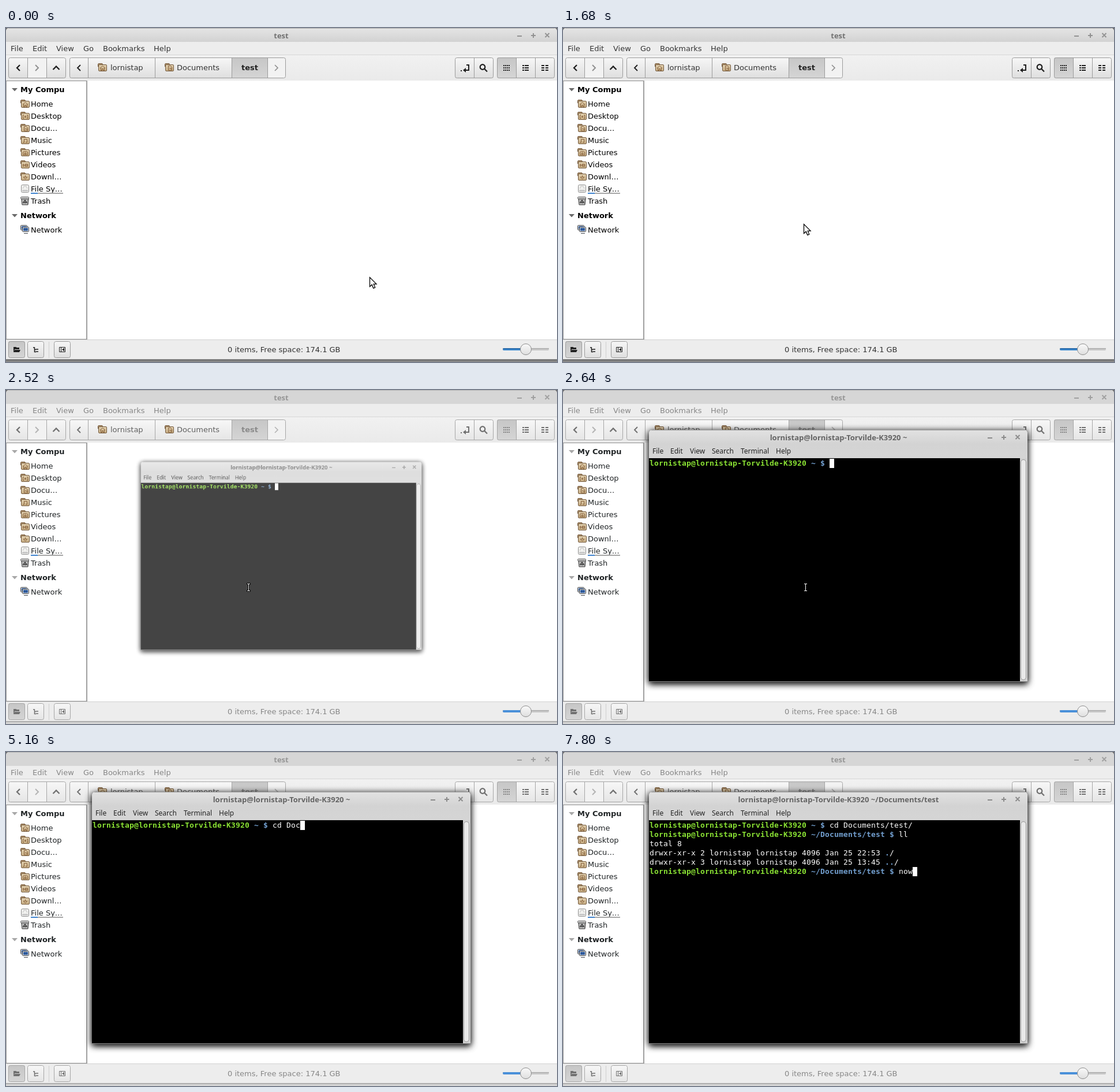
An HTML page with a canvas that plays this animation: 955 px wide and 578 px high, repeating every 8000 ms.

```html
<!DOCTYPE html>
<html lang="en">
<head>
<meta charset="utf-8">
<title>Terminal demo</title>
<style>
html, body { margin: 0; width: 100%; height: 100%; overflow: hidden; background: #777; }
canvas { display: block; }
</style>
</head>
<body>
<canvas id="stage" width="955" height="578"></canvas>
<script>
const W = 955, H = 578, LOOP = 8000, STEP = 120;
const UI = '13px "DejaVu Sans", sans-serif', UIB = 'bold ' + UI;
const TITLE = 'bold 13px "Noto Sans", sans-serif', SMALL = '12px "Noto Sans", sans-serif';
const MONO = '13px "DejaVu Sans Mono", monospace';
const USER = 'lornistap', HOST = USER + '@' + USER + '-Torvilde-K3920';

function layer(paint) {
  const c = document.createElement('canvas');
  c.width = W; c.height = H;
  const g = c.getContext('2d');
  if (paint) paint(g);
  return c;
}
function text(g, s, x, y, font, color, align = 'left') {
  g.font = font; g.fillStyle = color; g.textAlign = align;
  g.fillText(s, x, y);
}
function rect(g, x, y, w, h, color) { g.fillStyle = color; g.fillRect(x, y, w, h); }
function path(g, x, y, d, stroke, width = 2, fill) {
  const p = new Path2D(d);
  g.save();
  g.translate(x, y);
  if (fill) { g.fillStyle = fill; g.fill(p); }
  if (stroke) { g.strokeStyle = stroke; g.lineWidth = width; g.stroke(p); }
  g.restore();
}
function stops(d, colors) {
  colors.forEach((c, i) => d.addColorStop(i / (colors.length - 1), c));
  return d;
}
const down = (g, y0, y1, ...colors) => stops(g.createLinearGradient(0, y0, 0, y1), colors);
const across = (g, x0, x1, ...colors) => stops(g.createLinearGradient(x0, 0, x1, 0), colors);
function round(g, x, y, w, h, r, fill, stroke) {
  g.beginPath();
  g.roundRect(x, y, w, h, r);
  if (fill) { g.fillStyle = fill; g.fill(); }
  if (stroke) { g.strokeStyle = stroke; g.lineWidth = 1; g.stroke(); }
}
function menu(g, words, x, y, gap, font, color) {
  for (const word of words.split(' ')) {
    text(g, word, Math.round(x), y, font, color);
    x += g.measureText(word).width + gap;
  }
}
function controls(g, x, y, color) {
  path(g, x, y, 'M-4 1h8M20 0h8M24-4v8M44.5-4l7 7m0-7l-7 7', color);
}

// --- wallpaper: soft gradients in the tones of a night sky ---
function sky(g) {
  const LEAN = .18;
  let seed = 19;
  const rnd = () => (seed = seed * 16807 % 2147483647) / 2147483647;
  const blob = (x, y, rx, ry, color, alpha = .8, lean = 0) => {
    g.save();
    g.globalAlpha = alpha;
    g.transform(1, 0, -lean, 1, 0, 0);
    g.translate(x, y); g.scale(rx, ry);
    g.fillStyle = stops(g.createRadialGradient(0, 0, 0, 0, 0, 1), [color, color + 'd0', color + '80', color + '30', color + '00']);
    g.fillRect(-1, -1, 2, 2);
    g.restore();
  };
  // x is where the leaning ray would meet the top edge
  const ray = (x, y, rx, ry, color, alpha) => blob(x, y, rx, ry, color, alpha, LEAN);
  const veil = (fill, mask, lean = 0) => g.drawImage(layer(v => {
    v.transform(1, 0, -lean, 1, 0, 0);
    rect(v, 0, 0, W * 2, H, fill);
    v.globalCompositeOperation = 'destination-in';
    rect(v, 0, 0, W * 2, H, mask);
  }), 0, 0);

  rect(g, 0, 0, W, H, down(g, 0, H, '#3f8277', '#4a9d7a', '#459470', '#46956e', '#7ccc8a', '#62a680', '#48625f', '#35505a', '#132d4a'));
  blob(270, 90, 190, 160, '#74c898');
  blob(510, 80, 160, 280, '#82969a');
  blob(470, 215, 170, 140, '#a5b49f');
  blob(40, 300, 190, 60, '#94ea88', .6);
  blob(300, 380, 200, 70, '#64896e');
  blob(330, 285, 180, 75, '#aee596');
  blob(405, 310, 120, 75, '#f2f0b4', .9);
  blob(560, 380, 140, 110, '#8f9580');
  blob(310, 450, 210, 90, '#7f865f', .7);
  blob(550, 460, 190, 90, '#9c8f62', .8);

  veil(down(g, 0, H, '#336458', '#2f6059', '#2c5a5b', '#223f55', '#13294a', '#0f2246'), across(g, 690, W, '#0000', '#000b', '#000'));
  blob(955, 70, 80, 130, '#43906f', .6);
  blob(800, 340, 110, 200, '#4b5d6c', .7);
  blob(610, 330, 90, 110, '#a8949d', .7);

  veil(across(g, 570, 850, '#75478b00', '#75478b', '#643b82', '#6c4088', '#87509a', '#7c4489', '#71497f80', '#71497f00'),
    down(g, 0, 480, '#000', '#000', '#000c', '#0006', '#0000'), LEAN);
  for (let i = 0; i < 16; i++) ray(610 + rnd() * 200, 60 + rnd() * 240, 5 + rnd() * 10, 180, i % 2 ? '#b078b0' : '#583480', .2);
  ray(597, 205, 24, 125, '#d2c8be', .8);
  ray(840, 150, 35, 140, '#6a8090', .5);
  ray(744, 200, 32, 240, '#c283b0', .75);
  ray(778, 310, 24, 170, '#7e3f80', .8);
  ray(734, 340, 38, 130, '#f0cdb0', .85);
  ray(813, 330, 14, 190, '#b591a5', .6);
  ray(612, 450, 36, 85, '#c2a66c', .8);
  blob(710, 470, 60, 30, '#829838');
  blob(645, 438, 52, 52, '#ffe18d', 1);
  ray(821, 470, 8, 45, '#c4bd78', .8);

  rect(g, 0, 0, W, H, down(g, 495, 545, '#16334d00', '#16334d', '#15314d'));
  blob(970, 500, 200, 160, '#0f2146', .9);
  for (let i = 0; i < 85; i++) {
    g.beginPath();
    g.arc(rnd() * W, rnd() * 490, .4 + rnd() * .8, 0, 7);
    g.fillStyle = '#dff4f5b0';
    g.fill();
  }
}

// --- file manager ---
const EMBLEMS = {
  home: 'M4 9.5l4.5-4 4.5 4M5.5 9v4.5h2v-3h2v3h2V9',
  desk: 'M6 6.5H4.5v6H6M11 6.5h1.5v6H11M7.5 8.5h2v2h-2z',
  doc: 'M6.5 5.5h4l2 2.5v5h-6zM8 9.5h3v2',
  music: 'M6.5 12V6.5h5V12M4 12h3M9 12h3',
  pic: 'M4.5 7.5l2-1h4l2 1v5h-8zM7 9h3v2H7z',
  video: 'M4.5 7.5l3 2-3 2zM8.5 7.5h4v4h-4zM8 9.5h5',
  down: 'M8.5 6v3H5l3.5 3.5L12 9H8.5'
};
function folder(g, x, y, kind) {
  round(g, x + .5, y + 1.5, 8, 6, 1.5, '#b5976f', '#745a3e');
  round(g, x + 1.5, y + 3.5, 14, 11, 1.5, down(g, y + 3, y + 15, '#e3d2b2', '#c4aa80'), '#745a3e');
  path(g, x, y, EMBLEMS[kind], '#86603b', 1);
}
function device(g, x, y, kind) {
  if (kind === 'disk') {
    round(g, x + 1.5, y + 1.5, 13, 13, 2, '#f1f1ef', '#8e8e8e');
    path(g, x, y, 'M4 8l2-4h4l2 4', '#c2c2c2', 1);
    rect(g, x + 3, y + 10, 10, 3, '#c9c9c9');
  } else if (kind === 'bin') {
    path(g, x, y, 'M1.5 3h13l-1.5 12H3z', '#444', 1, '#a0a0a0');
    round(g, x + .5, y + 1.5, 14, 3, 1, '#e0e0e0', '#444');
    path(g, x, y, 'M4.5 6v8M7.5 6v8M10.5 6v8', '#ddd', 1);
    path(g, x, y, 'M5 11l3-4 3 4z', '#333', 1.3);
  } else {
    for (const d of [0, 3]) {
      round(g, x + d + .5, y + d + .5, 11, 8, 1, '#e8e8e8', '#353a40');
      rect(g, x + d + 2, y + d + 2, 8, 5, '#2f5b9c');
    }
    rect(g, x + 6, y + 14, 7, 1, '#454a50');
  }
}
function files(g, focus) {
  const ink = focus ? '#1f1f1f' : '#707070', soft = focus ? '#333' : '#878787';
  const body = focus ? '#000' : '#202426', edge = focus ? '#9b9b9b' : '#a6a6a6';
  const off = focus ? '#909090' : '#b4b4b4', label = focus ? '#333' : '#606060';

  rect(g, 0, 0, W, H, '#666');
  round(g, 0, 0, W, 60, [5, 5, 0, 0], focus ? down(g, 0, 24, '#e5e5e5', '#d2d2d2') : '#d6d6d6');
  rect(g, 4, 0, W - 8, 1, focus ? '#aaa' : '#b5b5b5');
  text(g, 'test', 477, 18, TITLE, focus ? '#727272' : '#969696', 'center');
  controls(g, 890, 13, focus ? '#929292' : '#a0a0a0');
  rect(g, 0, 24, W, 550, '#ededed');
  rect(g, 0, 46, W, 1, '#d6d6d6');
  rect(g, 0, 47, W, 44, down(g, 47, 91, '#f1f1f1', '#eaeaea'));
  menu(g, 'File Edit View Go Bookmarks Help', 8, 40, 16, UI, soft);

  const group = (xs, y, h, pressed, disabled) => {
    const x = xs[0], w = xs[xs.length - 1] - x;
    g.save();
    round(g, x, y, w, h, 3);
    g.clip();
    xs.slice(0, -1).forEach((left, i) => {
      rect(g, left, y, xs[i + 1] - left, h, i === pressed ? down(g, y, y + h, '#c6c6c6', '#d5d5d5')
        : i === disabled ? '#f2f2f2' : down(g, y, y + h, '#f7f7f7', focus ? '#dedede' : '#e5e5e5'));
      if (i) rect(g, left, y, 1, h, edge);
    });
    g.restore();
    round(g, x + .5, y + .5, w - 1, h - 1, 3, null, edge);
  };
  group([4, 37, 70, 104], 51, 36, -1, 1);
  group([110, 142, 258, 391, 453, 485], 51, 36, 3, 4);
  group([778, 811, 845], 51, 36);
  group([851, 884, 917, 951], 51, 36, 0);

  const LEFT = 'M2.5-5l-5 5 5 5', RIGHT = 'M-2.5-5l5 5-5 5';
  path(g, 21.5, 69, LEFT, ink, 2.3);
  path(g, 53.5, 69, RIGHT, off);
  path(g, 87, 69, 'M-5.5 3L0-2.5 5.5 3', ink, 2.3);
  path(g, 126.5, 69, LEFT, ink, 1.9);
  path(g, 468.5, 69, RIGHT, off, 1.7);
  folder(g, 159, 60, 'home');
  folder(g, 275, 60, 'doc');
  text(g, USER, 181, 73, UI, label);
  text(g, 'Documents', 296, 73, UI, label);
  text(g, 'test', 408, 73, UIB, focus ? '#222' : '#8a8a8a');

  path(g, 788, 64, 'M0 10h2M10 0h4v9H9', ink);
  path(g, 788, 64, 'M4 9l5-4v8z', null, 0, ink);
  path(g, 826, 67.5, 'M4.3 0a4.3 4.3 0 1 1-8.6 0a4.3 4.3 0 1 1 8.6 0M3 3l5 5', ink, 2.2);
  for (let y = 64; y < 76; y += 4) {
    for (let c = 0; c < 4; c++) rect(g, 862 + c * 3, y, 2, 2, focus ? ink : '#858585');
    path(g, 895, y + 1, 'M0 0h3m1 0h7M33 0h5m2 0h5', ink);
  }

  rect(g, 0, 91, W, 449, '#fff');
  rect(g, 0, 91, 141, 1, '#8f8f8f');
  rect(g, 0, 91, 1, 448, '#9b9b9b');
  rect(g, 139, 91, 2, 448, '#a0a0a0');
  rect(g, 0, 538, 141, 1, '#8f8f8f');
  const head = (s, y) => {
    path(g, 10, y - 7, 'M0 0h10l-5 5.5z', null, 0, focus ? '#6a6a6a' : '#a8a8a8');
    text(g, s, 25, y, UIB, body);
  };
  const place = (s, y, kind) => {
    (EMBLEMS[kind] ? folder : device)(g, 25, y - 13, kind);
    text(g, s, 43, y, UI, body);
  };
  const kinds = [...Object.keys(EMBLEMS), 'disk', 'bin'];
  head('My Compu', 111);
  'Home,Desktop,Docu…,Music,Pictures,Videos,Downl…,File Sy…,Trash'.split(',')
    .forEach((s, i) => place(s, 136 + i * 21, kinds[i]));
  rect(g, 43, 285, 56, 2, '#a6a6a6');
  rect(g, 43, 285, 12, 2, '#3f83cf');
  head('Network', 329);
  place('Network', 354, 'net');

  rect(g, 0, 539, W, 1, '#d2d2d2');
  [4, 37, 83].forEach((x, i) => group([x, x + 29], 542, 29, i ? -1 : 0));
  rect(g, 74, 543, 1, 28, '#cfcfcf');
  path(g, 13, 552, 'M0 0h5v1h5v3H2L0 9zM2 5h10l-2 4H0z', null, 0, ink);
  path(g, 47, 552, 'M0 1h3M2.5 1v7.5H5M2.5 4.5H5M5 4h4M5 8h4', ink, 1.5);
  path(g, 92.5, 552.5, 'M0 0h10v8H0zM3 0v8', ink, 1);
  path(g, 97, 556.5, 'M0 0l4-3v6z', null, 0, ink);
  text(g, '0 items, Free space: 174.1 GB', 384, 561, UI, soft);

  round(g, 861, 554, 80, 4, 2, '#c6c6c6');
  rect(g, 861, 554, 80, 1, '#a5a5a5');
  round(g, 861, 554, 34, 4, 2, focus ? down(g, 554, 558, '#1f5f9e', '#4a98dd') : '#4a90d9');
  round(g, 891.5, 546.5, 19, 19, 9.5, down(g, 546, 566, '#fafafa', '#dedede'), '#8c8c8c');

  rect(g, 0, 573, W, 1, focus ? '#858585' : '#999');
  rect(g, 0, 574, W, 4, focus ? down(g, 574, 578, '#6c6c6c', '#929292') : down(g, 574, 578, '#c3c3c3', '#dcdcdc'));
}

// --- terminal ---
const ENTER1 = 6480, ENTER2 = 6960;
const GREEN = '#8ae234', BLUE = '#729fcf', WHITE = '#fff';
const keys = (t, from, s) => s.slice(0, Math.max(0, Math.floor((t - from) / STEP) + 1));
const tab = (t, from, s) => t < from ? '' : s;

function terminal(g, t) {
  g.clearRect(0, 0, W, H);
  g.save();
  g.shadowColor = 'rgba(0,0,0,.75)'; g.shadowBlur = 12; g.shadowOffsetY = 3;
  for (let i = 0; i < 2; i++) round(g, 149, 69, 656, 436, [5, 5, 0, 0], '#858585');
  g.restore();
  round(g, 149, 69, 656, 435, [5, 5, 0, 0], down(g, 69, 118, '#e2e2e2', '#d3d3d3', '#d5d5d5'));
  rect(g, 153, 69, 648, 1, '#a5a5a5');
  const dir = t >= ENTER1 ? '~/Documents/test' : '~';
  text(g, HOST + ' ' + dir, 477.5, 87, TITLE, '#646464', 'center');
  controls(g, 740, 82, '#8b8b8b');
  menu(g, 'File Edit View Search Terminal Help', 155, 110, 12, SMALL, '#222');
  rect(g, 149, 118, 643, 386, '#000');
  rect(g, 792, 118, 12, 386, '#d0d0d0');
  round(g, 793.5, 120.5, 9, 381, 4.5, '#e9e9e9', '#969696');

  let row = 0, col = 0;
  const put = (s, color = WHITE, bold = '') => {
    for (const ch of s) text(g, ch, 150 + 8 * col++, 131 + 16 * row, bold + MONO, color);
  };
  const newline = () => { row++; col = 0; };
  const prompt = where => { put(HOST, GREEN, 'bold '); put(` ${where} $ `, BLUE, 'bold '); };
  const entry = (n, time, name) => {
    put(`drwxr-xr-x ${n} ${USER} ${USER} 4096 Jan 25 ${time} `);
    put(name, BLUE, 'bold ');
    put('/');
    newline();
  };
  prompt('~');
  put(keys(t, 3720, 'cd ') + keys(t, 4440, 'Do') + keys(t, 5160, 'c') + tab(t, 5280, 'uments/')
    + keys(t, 5880, 'te') + tab(t, 6240, 'st/'));
  if (t >= ENTER1) {
    newline();
    prompt(dir);
    put(keys(t, 6720, 'll'));
  }
  if (t >= ENTER2) {
    newline();
    put('total 8');
    newline();
    entry(2, '22:53', '.');
    entry(3, '13:45', '..');
    prompt(dir);
    put(tab(t, 7680, 'no') + tab(t, 7800, 'w'));
  }
  if (t < 3000 || t >= 3600) rect(g, 150 + 8 * col, 119 + 16 * row, 8, 16, WHITE);
}

// --- pointer: short glides and one round sweep, sampled every STEP ---
const part = (t, a, b) => Math.min(1, Math.max(0, (t - a) / (b - a)));
const mix = (a, b, p) => a + (b - a) * p;
function pointer(time) {
  const t = Math.floor(time / STEP) * STEP;
  if (t >= 2400) {
    const p = part(t, 2880, 3120);
    return [mix(420, 416, p), mix(341, 323, p)];
  }
  if (t >= 960) {
    const p = part(t, 1080, 1680), r = 1 - .17 * p ** 8, a = mix(200, 480, p) * Math.PI / 180;
    return [520 + 247 * r * Math.cos(a), 213 + 175 * r * Math.sin(a)].map(Math.round);
  }
  const p = part(t, 0, 360), q = part(t, 600, 840);
  return [mix(mix(630, 565, p), 241, q), mix(mix(431, 412, p), 92, q)].map(Math.round);
}
function arrow(g, x, y) {
  path(g, x + .5, y + .5, 'M0 0v16l3.7-3.3 2.6 6.1 2.9-1.2-2.5-6h4.8z', '#000', 1.3, '#fff');
}
function beam(g, x, y) {
  path(g, x, y, 'M.5-6V6M-3-5.5h7M-3 6.5h7', '#000', 3);
  path(g, x, y, 'M.5-6V6M-2-5.5h5M-2 6.5h5', '#fff', 1);
}

const stage = document.getElementById('stage').getContext('2d');
const active = layer(g => files(g, true)), idle = layer(g => files(g, false)), night = layer(sky);
const shell = layer(), shellCtx = shell.getContext('2d');

function draw(t) {
  const g = stage;
  g.drawImage(t < 2400 ? active : t < 2520 ? night : idle, 0, 0);
  if (t >= 2520) {
    terminal(shellCtx, t);
    g.save();
    if (t < 2640) {
      g.globalAlpha = .735;
      g.translate(477, 287); g.scale(.742, .748); g.translate(-477, -287);
    }
    g.drawImage(shell, 0, 0);
    g.restore();
  }
  if (t < 2400) arrow(g, ...pointer(t));
  else if (t < 3720) beam(g, ...pointer(t));
}

const start = performance.now();
function tick() {
  draw((performance.now() - start) % LOOP);
  requestAnimationFrame(tick);
}
draw(0);
requestAnimationFrame(tick);
</script>
</body>
</html>
```
